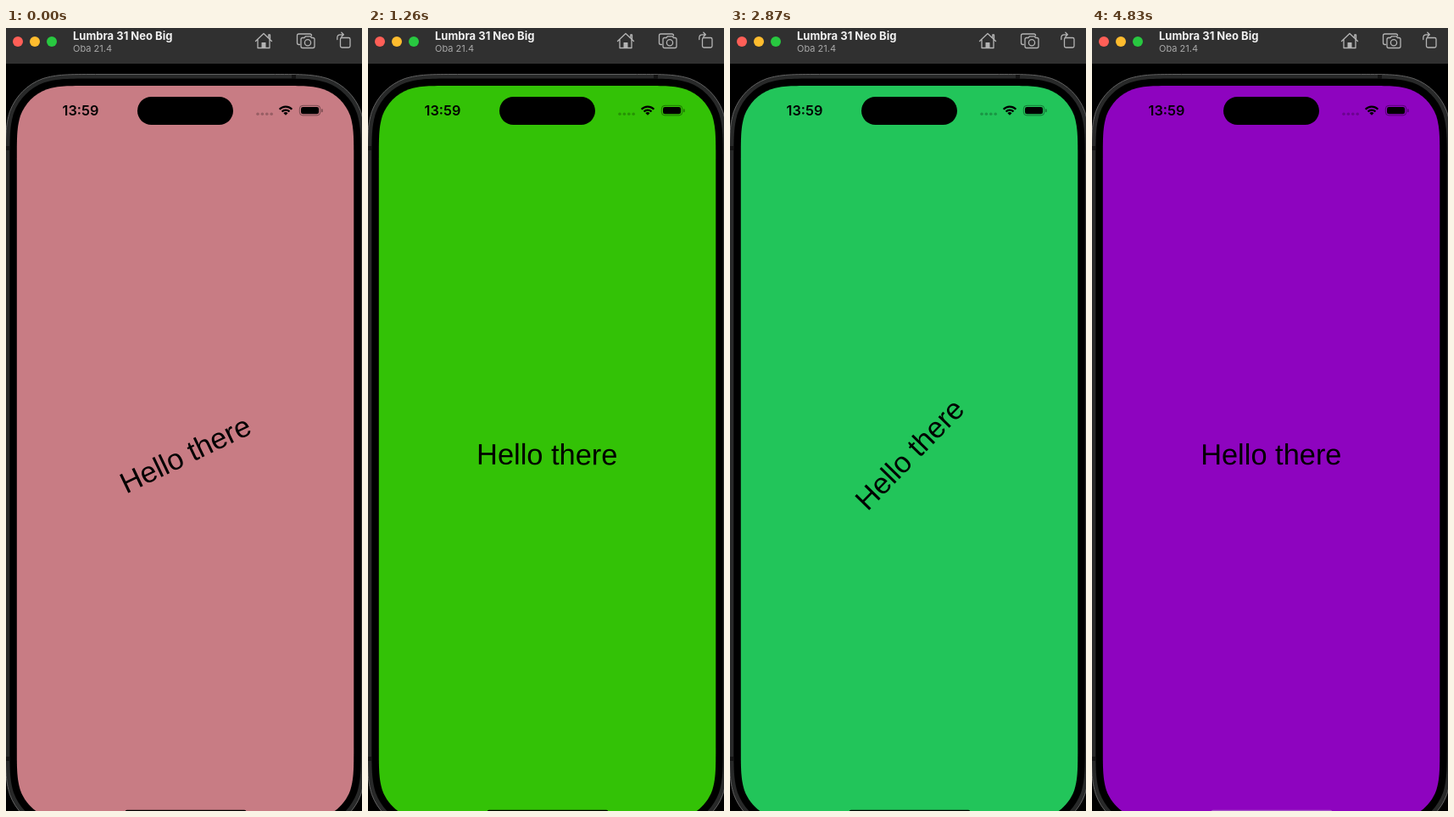
An HTML page with a canvas that plays this animation: 420 px wide and 922 px high, repeating every 5.32 s.

```html
<!DOCTYPE html>
<html lang="en">
<head>
<meta charset="utf-8">
<title>Spinning greeting</title>
<style>
  html, body { margin: 0; width: 100%; height: 100%; overflow: hidden; background: #000; }
  canvas { display: block; width: 420px; height: 922px; }
</style>
</head>
<body>
<canvas id="stage" width="420" height="922"></canvas>
<script>
const ctx = document.getElementById('stage').getContext('2d');
const LOOP = 5320, STEP = 70, LAST = 4830;
const TAU = Math.PI * 2;

// Each tap sets a new background and adds one springy full turn.
const taps = [
  { at: -393, color: '#c87c84', bar: '#000' },
  { at: 329, color: '#33c206', bar: '#000' },
  { at: 1523.5, color: '#3dc64b', bar: '#000' },
  { at: 2520.5, color: '#22c55a', bar: '#000' },
  { at: 3430.5, color: '#8e04bf', bar: '#a655c8' }
];

const DECAY = 6.05, FREQ = 18.7;

function springTurn(ms) {
  const s = ms / 1000;
  const rest = Math.exp(-DECAY * s) * (Math.cos(FREQ * s) + DECAY / FREQ * Math.sin(FREQ * s));
  return TAU * (1 - rest);
}

function fillBox(x, y, w, h, r, color) {
  ctx.fillStyle = color;
  ctx.beginPath();
  ctx.roundRect(x, y, w, h, r);
  ctx.fill();
}

function dot(x, y, r, color) {
  ctx.fillStyle = color;
  ctx.beginPath();
  ctx.arc(x, y, r, 0, TAU);
  ctx.fill();
}

function label(text, x, y, font, color, align = 'left') {
  ctx.font = font;
  ctx.fillStyle = color;
  ctx.textAlign = align;
  ctx.fillText(text, x, y);
}

// Rectangle with continuous-curvature corners, grown outwards from the screen.
function bodyPath(grow) {
  const x = 12.8 - grow, y = 68 - grow, w = 397.5 + grow * 2, h = 865 + grow * 2, r = 56 + grow;
  const path = new Path2D();
  const corner = (cx, cy, ux, uy, vx, vy) => {
    const p = (a, b) => [cx + (ux * a + vx * b) * r, cy + (uy * a + vy * b) * r];
    path.lineTo(...p(1.529, 0));
    path.bezierCurveTo(...p(1.088, 0), ...p(0.868, 0), ...p(0.631, 0.075));
    path.bezierCurveTo(...p(0.373, 0.169), ...p(0.169, 0.373), ...p(0.075, 0.631));
    path.bezierCurveTo(...p(0, 0.868), ...p(0, 1.088), ...p(0, 1.529));
  };
  corner(x, y, 0, 1, 1, 0);
  corner(x + w, y, -1, 0, 0, 1);
  corner(x + w, y + h, 0, -1, -1, 0);
  corner(x, y + h, 1, 0, 0, -1);
  path.closePath();
  return path;
}

const shell = bodyPath(13.5), bezel = bodyPath(8.5), screen = bodyPath(0);

function drawToolbar() {
  ctx.fillStyle = '#303030';
  ctx.fillRect(0, 0, 420, 42);
  ['#ff5f57', '#febc2e', '#28c840'].forEach((c, i) => dot(14 + i * 20, 16, 6, c));
  label('Lumbra 31 Neo Big', 79, 14, '700 13px Inter, sans-serif', '#f2f2f2');
  label('Oba 21.4', 79, 28, '400 11px Inter, sans-serif', '#a9a9a9');

  ctx.strokeStyle = '#b4b4b4';
  ctx.lineWidth = 1.3;
  ctx.lineJoin = ctx.lineCap = 'round';
  ctx.stroke(new Path2D('M294.5 15.5L304 6.5L313.5 15.5M297 13.5V23.5H311V13.5M309.8 11.5V8H311.5V13'));
  fillBox(301.5, 17, 5, 7, 0.5, '#b4b4b4');

  ctx.stroke(new Path2D('M346.5 19.5H345.5Q343.5 19.5 343.5 17.5V9Q343.5 7 345.5 7H358.5Q360.5 7 360.5 9'));
  ctx.stroke(new Path2D('M350 11.5H352L353.5 9.8H359L360.5 11.5H362Q364 11.5 364 13.5V21.5Q364 23.5 362 23.5H350Q348 23.5 348 21.5V13.5Q348 11.5 350 11.5Z'));
  ctx.beginPath();
  ctx.arc(356, 17.2, 3.6, 0, TAU);
  ctx.stroke();

  ctx.beginPath();
  ctx.roundRect(394.5, 11.5, 11.5, 11.5, 1.8);
  ctx.stroke();
  ctx.stroke(new Path2D('M390.8 13.5V11.5Q390.8 7.8 394.5 7.8H398M395.8 5.3L398.3 7.8L395.8 10.3'));
}

function drawPhone(color) {
  ctx.fillStyle = '#282929';
  ctx.fill(shell);
  ctx.strokeStyle = '#626262';
  ctx.lineWidth = 1;
  ctx.stroke(shell);
  ctx.fillStyle = '#141414';
  ctx.fillRect(0, 139, 4, 5);
  ctx.fillRect(0, 858, 4, 5);
  ctx.fillRect(337, 55, 5, 4.5);
  ctx.fillStyle = '#000';
  ctx.fill(bezel);
  ctx.fillStyle = color;
  ctx.fill(screen);
}

function drawStatus(barColor) {
  fillBox(155, 81, 113, 33, 16.5, '#000');
  label('13:59', 88, 103.2, '600 16.3px Inter, sans-serif', '#000', 'center');
  for (let i = 0; i < 4; i++) dot(297 + i * 5.4, 101.3, 1.8, 'rgba(0,0,0,.24)');

  // Wi-Fi fan
  const cx = 330, cy = 102.8, half = 0.8;
  ctx.strokeStyle = '#000';
  ctx.lineCap = 'butt';
  ctx.lineWidth = 2.3;
  for (const r of [6.2, 10.2]) {
    ctx.beginPath();
    ctx.arc(cx, cy, r, -Math.PI / 2 - half, -Math.PI / 2 + half);
    ctx.stroke();
  }
  ctx.fillStyle = '#000';
  ctx.beginPath();
  ctx.moveTo(cx, cy);
  ctx.arc(cx, cy, 3.6, -Math.PI / 2 - half, -Math.PI / 2 + half);
  ctx.fill();

  // Battery
  ctx.strokeStyle = 'rgba(0,0,0,.4)';
  ctx.lineWidth = 1;
  ctx.beginPath();
  ctx.roundRect(346.3, 91.3, 24.5, 11.6, 3.8);
  ctx.stroke();
  fillBox(348, 93, 21.1, 8.2, 2.3, '#000');
  fillBox(372.2, 95.2, 1.4, 4, 0.7, 'rgba(0,0,0,.45)');

  fillBox(140.5, 920.8, 143, 5, 2.5, barColor);
}

function drawGreeting(angle) {
  ctx.save();
  ctx.translate(211.3, 501.5);
  ctx.rotate(angle);
  label('Hello there', 0, 12.5, '400 34.4px "Liberation Sans", Arial, sans-serif', '#000', 'center');
  ctx.restore();
}

function render(ms) {
  const t = Math.min(Math.floor((ms % LOOP) / STEP) * STEP, LAST);
  const done = taps.filter(tap => tap.at <= t);
  const current = done[done.length - 1];
  const angle = done.reduce((sum, tap) => sum + springTurn(t - tap.at), 0);

  ctx.fillStyle = '#000';
  ctx.fillRect(0, 0, 420, 922);
  drawPhone(current.color);
  drawToolbar();
  drawStatus(current.bar);
  drawGreeting(angle);
}

const start = performance.now();
function tick() {
  render(performance.now() - start);
  requestAnimationFrame(tick);
}
tick();
</script>
</body>
</html>
```
